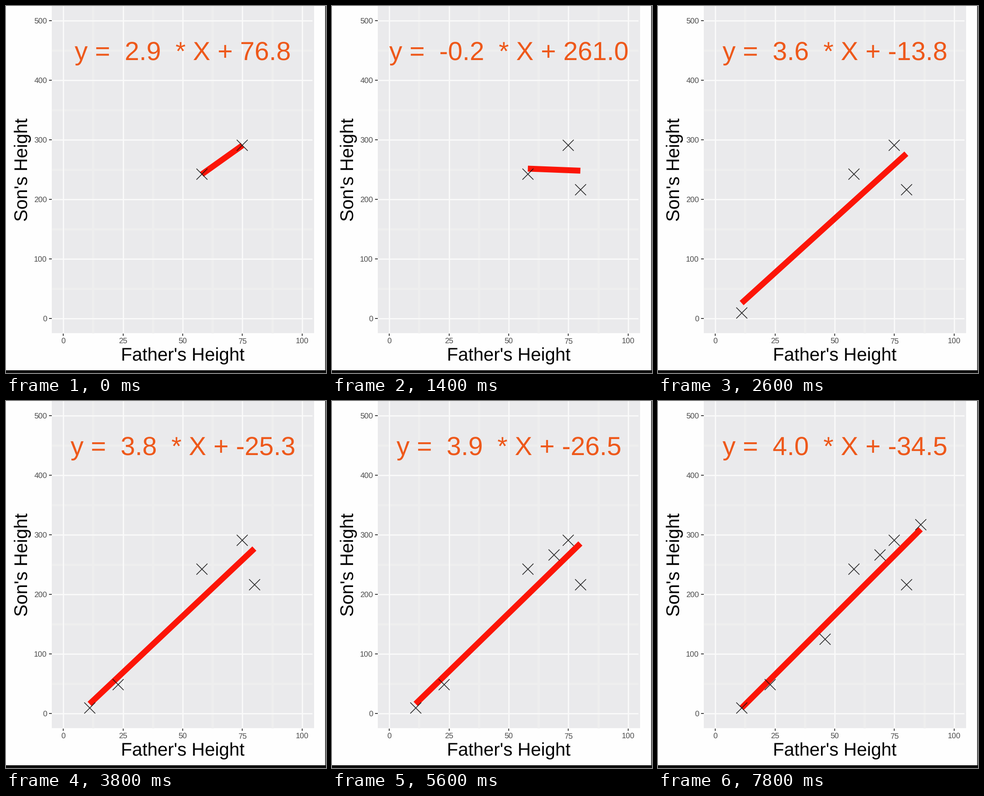
A matplotlib script that plays this animation: 699 by 801 pixels, repeating every 8000 ms.

```python
import numpy as np
import matplotlib.pyplot as plt
from matplotlib.animation import FuncAnimation
from matplotlib.patches import Rectangle

plt.rcParams["font.family"] = "Liberation Sans"
plt.rcParams["text.hinting"] = "none"
plt.rcParams["text.hinting_factor"] = 1

W, H, DPI = 699, 801, 64
PX = 72 / DPI  # points per pixel

PANEL, GRID, MINOR = "#eaeaec", "#fafafa", "#eeeeee"
RED, ORANGE, INK = "#fc1507", "#ee581a", "#111111"

# data in order of appearance; the first two are there from the start
FATHER = np.array([58, 75, 80, 11, 23, 69, 86, 46])
SON = np.array([242.4, 290.94, 216.2, 9.4, 48.5, 266.8, 317, 125.3])

# when each further point starts to fade in, in frames; a fade lasts one frame
ARRIVALS = np.array([0.4, 8, 17.8, 24, 28.2, 34.2])


def to_x(v):
    return 125.3 + 5.215 * v


def to_y(v):
    return 682.4 - 1.3 * v


fig = plt.figure(figsize=(W / DPI, H / DPI), dpi=DPI, facecolor="#fefefe")
ax = fig.add_axes([0, 0, 1, 1])
ax.set_xlim(0, W)
ax.set_ylim(H, 0)
ax.axis("off")


def box(x0, y0, x1, y1, color, z=0):
    ax.add_patch(Rectangle((x0, y0), x1 - x0, y1 - y0, facecolor=color,
                           edgecolor="none", zorder=z))


def line(xs, ys, color, width, z):
    return ax.plot(xs, ys, color=color, lw=width * PX, zorder=z,
                   solid_capstyle="butt")[0]


def text(x, y, s, size, color, ha="center", **kw):
    return ax.text(x, y, s, fontsize=size * PX, color=color, ha=ha,
                   va="baseline", **kw)


def draw_axes():
    box(100, 0, 672.5, 714, PANEL)
    for v in np.arange(12.5, 100, 25):
        line([to_x(v)] * 2, [0, 714], MINOR, 5, 1)
    for v in range(50, 500, 100):
        line([100, 669], [to_y(v)] * 2, MINOR, 5, 1)
    for v in range(0, 101, 25):
        x = to_x(v)
        line([x, x], [0, 714], GRID, 2.8, 2)
        line([x, x], [714.5, 719.5], "#444444", 2, 2)
        text(x, 737, str(v), 17.3, "#4d4d4d")
    for v in range(0, 501, 100):
        y = to_y(v)
        line([100, 669], [y, y], GRID, 2.8, 2)
        line([93.5, 99.5], [y, y], "#444444", 2, 2)
        text(89.5, y + 6.2, str(v), 17.3, "#4d4d4d", ha="right")
    text(386.5, 775, "Father's Height", 40.3, "#000000")
    text(47.5, 357, "Son's Height", 40.3, "#000000", rotation=90,
         rotation_mode="anchor")
    box(697, 0, W, 795, "#4a4a4a", 8)
    box(0, 795, W, H, "#0c0c0c", 9)


def make_layer():
    return (line([], [], RED, 12.9, 4),
            text(386.5, 118, "", 57.2, ORANGE, zorder=6))


def set_layer(layer, count, alpha):
    """Show the fit through the first points and its equation."""
    fit, label = layer
    xs = FATHER[:count]
    slope, base = np.polyfit(xs, SON[:count], 1)
    ends = np.array([xs.min(), xs.max()])
    fit.set_data(to_x(ends), to_y(slope * ends + base))
    label.set_text(f"y =  {slope:.1f}  * X + {base:.1f}")
    for artist in layer:
        artist.set_alpha(alpha)
        artist.set_visible(alpha > 0)


def make_cross(father, son):
    return ax.plot(to_x(father), to_y(son), "x", color=INK, ms=24 * PX,
                   mew=1.6 * PX, zorder=5)[0]


draw_axes()
old, new = make_layer(), make_layer()
crosses = [make_cross(*p) for p in zip(FATHER, SON)]


def update(i):
    shown = 2 + np.clip(i - ARRIVALS, 0, 1).sum()
    count = int(shown + 1e-9)
    mix = max(0.0, shown - count)
    set_layer(old, count, 1 - mix)
    set_layer(new, count + 1, mix)
    for k, cross in enumerate(crosses):
        cross.set_alpha(0.9 * float(np.clip(shown - k, 0, 1)))
    return [*old, *new, *crosses]


anim = FuncAnimation(fig, update, frames=40, interval=200, repeat=True,
                     repeat_delay=0, blit=False)
plt.show()
```
